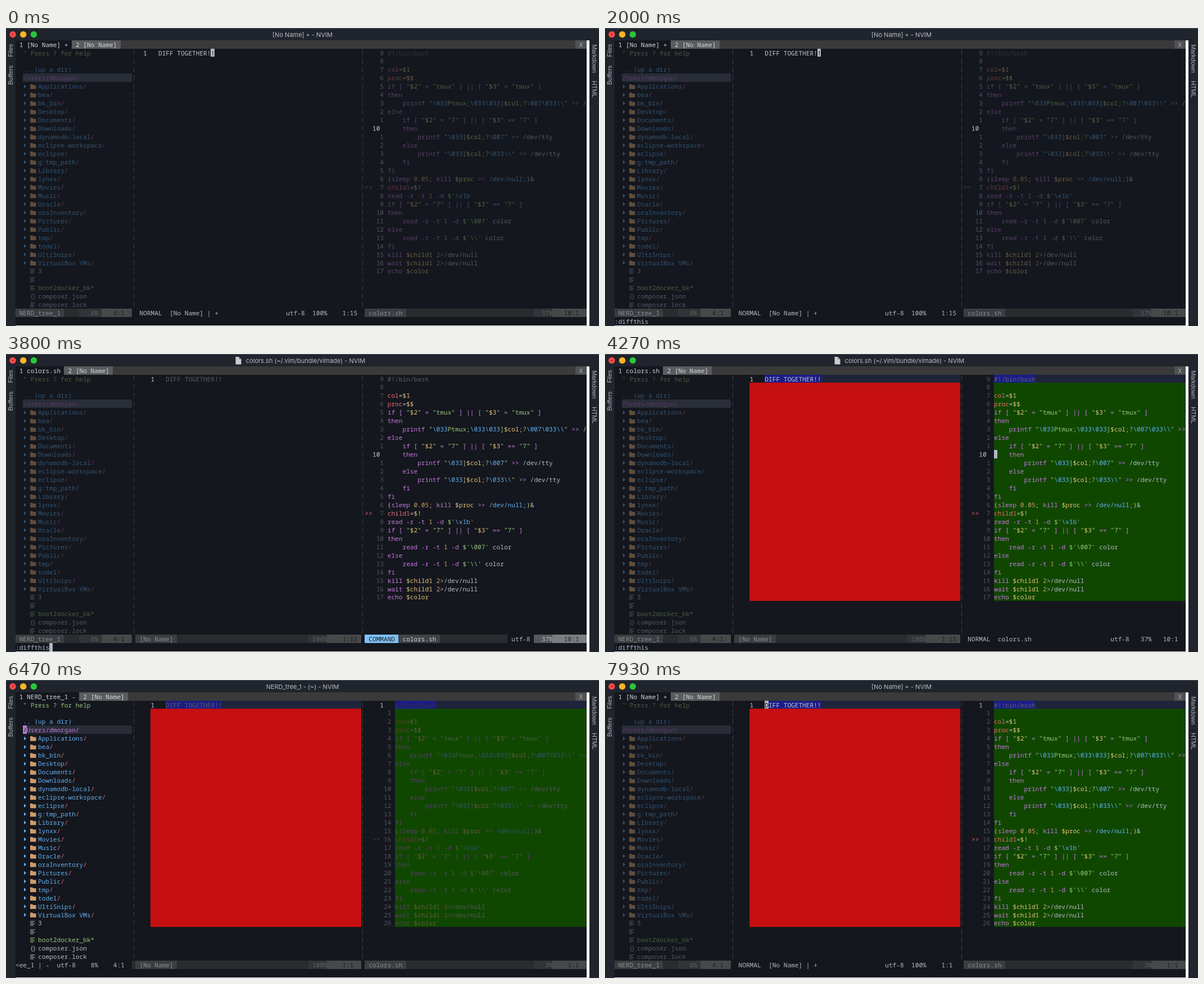
These frames come from a looping animation (1055x531 px, 8000 ms). An HTML page with a canvas:

```html
<!DOCTYPE html>
<html lang="en">
<head>
<meta charset="utf-8">
<title>Editor windows</title>
<style>
html, body { margin: 0; width: 100%; height: 100%; overflow: hidden; background: #14171e; }
canvas { display: block; }
</style>
</head>
<body>
<canvas id="stage" width="1055" height="531"></canvas>
<script>
const ctx = document.getElementById('stage').getContext('2d');
const LOOP = 8000, CW = 6.684, RH = 14.96, LEFT = 16.6, TOP = 36.5;
const BG = '#14171e', FG = '#b4bac5', PURPLE = '#c678dd', RED = '#e8696f', BLUE = '#61afef',
  GREEN = '#98c379', YELLOW = '#e5c07b', ORANGE = '#d19a66', COMMENT = '#5c6370', NUM = '#4f5663',
  FILL = '#292b2e', SEG = '#3b3d40', SEG2 = '#323437', SEG3 = '#474849';
const MONO = '11.14px "Noto Sans Mono", "DejaVu Sans Mono", monospace';
const CMD = ':diffthis';

const dirs = ['Applications', 'bea', 'bk_bin', 'Desktop', 'Documents', 'Downloads', 'dynamodb-local',
  'eclipse-workspace', 'eclipse', 'g:tmp_path', 'Library', 'lynxx', 'Movies', 'Music', 'Oracle',
  'oraInventory', 'Pictures', 'Public', 'tmp', 'todel', 'UltiSnips', 'VirtualBox VMs'];
const files = ['3', '', 'boot2docker_bk*', 'composer.json', 'composer.lock'];
const code = String.raw`#!/bin/bash

col=$1
proc=$$
if [ "$2" = "tmux" ] || [ "$3" = "tmux" ]
then
    printf "\033Ptmux;\033\033]$col;?\007\033\\" >> /dev/tty
else
    if [ "$2" = "7" ] || [ "$3" == "7" ]
    then
        printf "\033]$col;?\007" >> /dev/tty
    else
        printf "\033]$col;?\033\\" >> /dev/tty
    fi
fi
(sleep 0.05; kill $proc >> /dev/null;)&
child1=$!
read -r -t 1 -d $'\x1b'
if [ "$2" = "7" ] || [ "$3" == "7" ]
then
    read -r -t 1 -d $'\007' color
else
    read -r -t 1 -d $'\\' color
fi
kill $child1 2>/dev/null
wait $child1 2>/dev/null
echo $color`.split('\n');

const plainRules = [
  [/^#.*/, COMMENT], [/^\w+(?==)/, RED], [/^\/dev\/null;/, BLUE], [/^\\x1b/, BLUE],
  [/^\\(\d+|\\)/, GREEN], [/^\$(\w+|[$!])/, YELLOW], [/^\$?'/, GREEN],
  [/^(if|then|else|fi|printf|read|kill|wait|echo|sleep)\b/, PURPLE],
  [/^( ==? |\|\||[[\]]|>>|-\w)/, PURPLE], [/^[()]/, YELLOW], [/^\d[\d.]*/, ORANGE], [/^[\w/]+/, FG]
];
const stringRules = [[/^\\(\d{3}|\\)/, BLUE], [/^\$\w+/, YELLOW]];

// Split a shell line into [column, text, colour] runs.
function highlight(line) {
  const runs = [];
  let col = 0;
  line.split(/("[^"]*")/).forEach((part, i) => {
    while (part) {
      let text = part[0], color = i % 2 ? GREEN : FG;
      for (const [re, c] of i % 2 ? stringRules : plainRules) {
        const m = re.exec(part);
        if (m) { text = m[0]; color = c; break; }
      }
      runs.push([col, text, color]);
      col += text.length;
      part = part.slice(text.length);
    }
  });
  return runs;
}
const codeRuns = code.map(highlight);

const X = col => LEFT + col * CW;
const Y = row => TOP + row * RH;

function fade(color, faded) {
  if (!faded) return color;
  const channel = (hex, i) => parseInt(hex.slice(i, i + 2), 16);
  return 'rgb(' + [1, 3, 5].map(i => Math.round(channel(BG, i) * .6 + channel(color, i) * .4)) + ')';
}
function rect(x, y, w, h, color) {
  ctx.fillStyle = color;
  ctx.fillRect(x, y, w, h);
}
// Fill grid cells from column a up to b.
function cells(a, b, row, color, rows = 1) {
  const x = Math.round(X(a)), y = Math.round(Y(row));
  rect(x, y, Math.round(X(b)) - x, Math.round(Y(row + rows)) - y, color);
}
function put(col, row, text, color) {
  ctx.font = MONO;
  ctx.textAlign = 'left';
  ctx.fillStyle = color;
  ctx.fillText(text, X(col) + .4, Y(row) + 12);
}
function cursor(col, row, char = '', color = '#b3b8c3') {
  cells(col, col + 1, row, color);
  put(col, row, char, BG);
}
function turned(text, x, y, angle) {
  ctx.save();
  ctx.translate(x, y);
  ctx.rotate(angle);
  ctx.font = '11px "Liberation Sans", sans-serif';
  ctx.textAlign = 'center';
  ctx.fillStyle = '#b0b5bf';
  ctx.fillText(text, 0, 4);
  ctx.restore();
}

function stateAt(t) {
  const s = {
    focus: t < 2300 ? 'mid' : t < 4900 ? 'code' : t < 6130 || t >= 7200 ? 'mid' : 'tree',
    shifted: t >= 1800, diff: t >= 3950, top: t >= 4900, typing: false, cmd: ''
  };
  for (const [start, enter, clear] of [[860, 1800, 2300], [3000, 3950, 6130]]) {
    if (t >= start && t < clear) {
      s.cmd = CMD.slice(0, Math.floor((t - start) / 100) + 1);
      s.typing = t < enter;
    }
  }
  return s;
}

function frame(s) {
  rect(0, 0, 1055, 531, BG);
  rect(0, 0, 1055, 22, '#20242c');
  rect(0, 0, 1055, 1, '#4b4e54');
  rect(0, 22, 17, 509, '#20242c');
  rect(1038, 22, 17, 509, '#20242c');
  ['#fc4b48', '#fdb427', '#2bc53c'].forEach((color, i) => {
    ctx.fillStyle = color;
    ctx.beginPath();
    ctx.arc(12 + i * 18.7, 11.5, 5.7, 0, 7);
    ctx.fill();
  });
  rect(11, 10.5, 2, 2, '#7d1512');

  const title = { mid: '[No Name] + - NVIM', code: 'colors.sh (~/.vim/bundle/vimade) - NVIM',
    tree: 'NERD_tree_1 - (~) - NVIM' }[s.focus];
  ctx.font = '11px Inter, Roboto, sans-serif';
  ctx.textAlign = 'center';
  ctx.fillStyle = '#b9bcc2';
  ctx.fillText(title, s.focus === 'code' ? 533 : 527.5, 16);
  if (s.focus === 'code') {
    ctx.fillStyle = '#c9cbce';
    ctx.fill(new Path2D('M408.5 5h5.5l4.5 4.5v9h-10z'));
    ctx.fillStyle = '#8d9095';
    ctx.fill(new Path2D('M414 5v4.5h4.5z'));
  }
  turned('Files', 8, 40, -Math.PI / 2);
  turned('Buffers', 8, 84, -Math.PI / 2);
  turned('Markdown', 1047, 54.5, Math.PI / 2);
  turned('HTML', 1047, 109, Math.PI / 2);

  const label = ' 1 ' + { mid: '[No Name] +', code: 'colors.sh', tree: 'NERD_tree_1 -' }[s.focus] + ' ';
  const end = label.length;
  cells(end, 152, -1, '#3a3a3b');
  cells(end, end + 13, -1, '#5a5c5e');
  cells(149, 152, -1, '#505153');
  put(0, -1, label, '#d3d6dc');
  put(end, -1, ' 2 [No Name]', '#d3d6dc');
  put(150, -1, 'X', '#b0b3b8');

  ctx.strokeStyle = '#373b43';
  ctx.lineWidth = 1;
  ctx.setLineDash([10, RH - 10]);
  for (const col of [31, 92]) {
    const x = Math.floor(X(col + .5)) + .5;
    ctx.beginPath();
    ctx.moveTo(x, TOP + 2.5);
    ctx.lineTo(x, Y(31));
    ctx.stroke();
  }
  ctx.setLineDash([]);
}

function tree(active) {
  const c = color => fade(color, !active);
  put(2, 0, '" Press ? for help', c(GREEN));
  put(2, 2, '.. (up a dir)', c(BLUE));
  cells(2, 31, 3, '#282d37');
  put(2, 3, '/Users/dmorgan/', c(PURPLE));
  if (active) cursor(2, 3, '/', '#b57bcb');
  dirs.forEach((name, i) => {
    const row = i + 4, y = Y(row) + 8;
    ctx.fillStyle = c(BLUE);
    ctx.fill(new Path2D(`M32 ${y - 3.5}l4 3.5l-4 3.5z`));
    ctx.fillStyle = c('#cf9c6c');
    ctx.fill(new Path2D(`M43 ${y - 4}h4l1.5 1.5h5v7h-10.5z`));
    put(6, row, name, c(BLUE));
    put(6 + name.length, row, '/', c(RED));
  });
  files.forEach((name, i) => {
    const row = i + 26, color = c(name.endsWith('*') ? GREEN : FG);
    if (name.endsWith('json')) {
      put(3.8, row, '{', color);
      put(4.5, row, '}', color);
    } else {
      for (let k = 0; k < 4; k++) rect(43, Y(row) + 4 + k * 2.4, k % 2 ? 6 : 8.5, 1, color);
    }
    put(6, row, name, color);
  });
}

function middle(s, active) {
  const col = s.shifted ? 40 : 38, text = 'DIFF TOGETHER!!';
  if (s.diff) {
    cells(col, 92, 0, '#1e2439');
    cells(col, col + text.length, 0, '#1c1c86');
    cells(36, 92, 1, '#c50f10', 26);
  }
  put(col - 4, 0, '1', '#c8ccd4');
  const lit = active || s.diff && s.focus !== 'tree';
  put(col, 0, text, fade('#c3c8d1', !lit));
  if (!active || s.typing) return;
  if (s.top) cursor(col, 0, 'D');
  else cursor(col + 14, 0, '!');
}

function script(s, active) {
  const col = s.diff ? 101 : 99, current = s.top ? 0 : 9;
  const faded = !(active || s.diff && s.focus !== 'tree');
  ctx.save();
  ctx.beginPath();
  ctx.rect(0, 0, 1033, 531);
  ctx.clip();
  if (s.diff) {
    cells(col, 152, 0, '#1e2439');
    cells(col, col + 11, 0, '#1c1c86');
    cells(col, 152, 1, '#104700', 26);
  }
  codeRuns.forEach((runs, row) => {
    const isCurrent = row === current;
    const num = String(isCurrent ? row + 1 : Math.abs(row - current));
    put(isCurrent ? col - 4 : col - 1 - num.length, row, num, isCurrent ? '#c8ccd4' : NUM);
    for (const [at, text, color] of runs) put(col + at, row, text, fade(color, faded));
  });
  put(col - 6, 16, '>>', fade(RED, faded));
  if (active && !s.typing) cursor(col, 9);
  ctx.restore();
}

// One status line from column a to b; mode is empty for an inactive window.
function status(a, b, name, mark, percent, pos, posCol, mode) {
  const tail = b - 9, pct = b - 14;
  if (mode === 'NORMAL') {
    put(a + 1, 31, mode, FG);
    put(a + 9, 31, name + mark, FG);
  } else if (mode === 'COMMAND') {
    const stop = a + 11 + name.length + mark.length;
    cells(a, a + 9, 31, '#7fc1f5');
    cells(a + 9, stop, 31, '#414346');
    cells(stop, pct - 7, 31, FILL);
    cells(pct, tail, 31, '#56585a');
    cells(tail, b, 31, '#7b7d80');
    put(a + 1, 31, mode, '#1d2630');
    put(a + 10, 31, name + mark, '#d0d3d9');
  } else {
    cells(a, b, 31, FILL);
    cells(a, a + name.length + 2, 31, SEG);
    cells(pct, tail, 31, SEG2);
    cells(tail, b, 31, SEG3);
    put(a + 1, 31, name, '#8b8e93');
  }
  if (mode) put(pct - 6, 31, 'utf-8', FG);
  put(tail - percent.length, 31, percent, mode === 'COMMAND' ? '#b4b7bc' : mode ? FG : '#5d6064');
  put(posCol, 31, pos, mode === 'COMMAND' ? '#2a2d31' : mode ? FG : '#1c1e21');
}

function statusLines(s) {
  const mode = s.typing ? 'COMMAND' : 'NORMAL';
  if (s.focus === 'tree') {
    put(0, 31, '<ee_1 | -', FG);
    put(11, 31, 'utf-8', FG);
    put(20, 31, '8%', FG);
    put(26, 31, '4:1', FG);
    cells(31, 32, 31, FILL);
  } else {
    cells(0, 31, 31, FILL);
    cells(0, 13, 31, SEG);
    cells(17, 23, 31, SEG2);
    cells(23, 31, 31, SEG3);
    put(1, 31, 'NERD_tree_1', '#8b8e93');
    put(20, 31, '8%', '#5d6064');
    put(26, 31, '4:1', '#1c1e21');
  }
  status(32, 92, '[No Name]', s.focus === 'mid' ? ' | +' : '', '100%', s.top ? '1:1' : '1:15', 87,
    s.focus === 'mid' ? mode : '');
  status(93, 152, 'colors.sh', '', s.top ? '3%' : '37%', s.top ? '1:1' : '10:1', s.top ? 147 : 146,
    s.focus === 'code' ? mode : '');
  put(0, 32, s.cmd, FG);
  if (s.typing) cursor(s.cmd.length, 32);
}

function draw(now) {
  const s = stateAt(now % LOOP);
  frame(s);
  tree(s.focus === 'tree');
  middle(s, s.focus === 'mid');
  script(s, s.focus === 'code');
  statusLines(s);
  rect(1033, 22, 5, 509, '#f4f4f4');
  rect(17, 530, 1021, 1, '#e6e6e6');
}

const start = performance.now();
function tick() {
  draw(performance.now() - start);
  requestAnimationFrame(tick);
}
tick();
</script>
</body>
</html>
```
